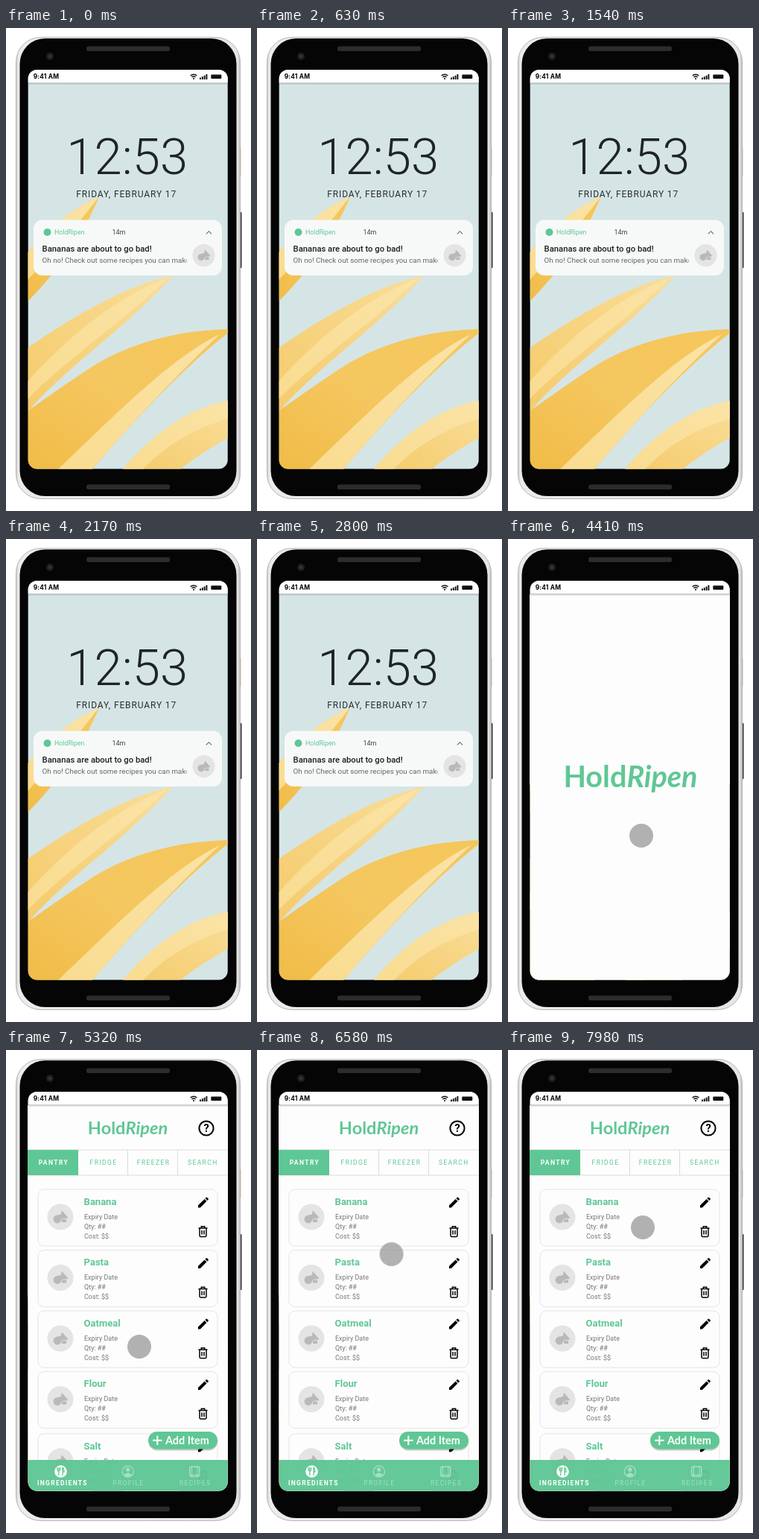
These frames come from a looping animation (329x648 px, 8000 ms). An HTML page:

```html
<!DOCTYPE html>
<html lang="en">
<head>
<meta charset="utf-8">
<title>Pantry app walkthrough</title>
<style>
  html, body { margin: 0; width: 100%; height: 100%; overflow: hidden; background: #fff; }
  svg { display: block; width: 100%; height: 100%; }
  text { font-family: Roboto, sans-serif; }
  .brand { font-family: Lato, sans-serif; font-weight: 700; fill: #5fc795; text-anchor: middle; }
  .brand tspan { font-style: italic; }
  .status { font: 700 8.4px Inter, sans-serif; letter-spacing: .2px; }
  .clock { font-size: 67px; font-weight: 300; text-anchor: middle; fill: #202426; }
  .date { font-size: 12px; letter-spacing: .87px; fill: #2b3032; }
  .tab { font-size: 8.5px; letter-spacing: 1.4px; fill: #5fc795; }
  .nav { font-size: 8.5px; letter-spacing: 1.3px; fill: #fff; }
  .on { font-weight: 700; fill: #fff; }
  .name { font-size: 13px; font-weight: 600; fill: #5fc795; }
  .info { font-size: 9px; fill: #777; }
  .add { font: 700 14.4px Lato, sans-serif; fill: #fff; }

  #splash, #pantry, #dot { animation: 8s linear infinite both; }
  #splash { animation-name: splash; }
  #pantry { animation-name: pantry; }
  #dot { animation-name: dot; }
  @keyframes splash {
    0%, 42% { opacity: 0; }
    45.6%, 100% { opacity: 1; }
  }
  @keyframes pantry {
    0%, 63% { opacity: 0; }
    66.4%, 100% { opacity: 1; }
  }
  @keyframes dot {
    0%, 41.9% { opacity: 0; transform: translate(179px, 374px); }
    42.9% { opacity: 1; }
    43.8% { transform: translate(179px, 374px); animation-timing-function: ease-in-out; }
    51.4%, 67.5% { transform: translate(179px, 398px); animation-timing-function: ease-in-out; }
    89% { transform: translate(181px, 242px); animation-timing-function: ease-out; }
    95%, 100% { opacity: 1; transform: translate(181px, 238px); }
  }
</style>
</head>
<body>
<svg viewBox="0 0 329 648" preserveAspectRatio="none">
  <defs>
    <clipPath id="screen"><rect x="29.7" y="56" width="268" height="535.5" rx="12"/></clipPath>
    <clipPath id="line"><rect x="48" y="300" width="194.5" height="24"/></clipPath>
    <linearGradient id="rim">
      <stop stop-color="#cfcfcf"/><stop offset=".012" stop-color="#ececec"/>
      <stop offset=".988" stop-color="#e6e6e6"/><stop offset="1" stop-color="#bdbdbd"/>
    </linearGradient>
    <linearGradient id="gold" x1="0" y1="1" x2="1" y2="0">
      <stop stop-color="#f1bc47"/><stop offset=".5" stop-color="#f5c760"/><stop offset="1" stop-color="#f4c65a"/>
    </linearGradient>
    <linearGradient id="amber" x1="0" y1="1" x2="1" y2="0">
      <stop stop-color="#f5cb6c"/><stop offset="1" stop-color="#f9dd98"/>
    </linearGradient>
    <linearGradient id="pale" x1="0" y1="1" x2="1" y2="0">
      <stop stop-color="#f9dc90"/><stop offset="1" stop-color="#fae3a6"/>
    </linearGradient>
    <linearGradient id="drop" x2="0" y2="1">
      <stop stop-color="#8a8f8c" stop-opacity=".6"/><stop offset="1" stop-color="#8a8f8c" stop-opacity="0"/>
    </linearGradient>
    <g id="food">
      <circle r="17.5" fill="#e4e4e4"/>
      <circle cx="-4" cy="3" r="5.4" fill="#b9b9b9"/>
      <path d="M2-8 10 1 1 2Z" fill="#b9b9b9" stroke="#b9b9b9" stroke-linejoin="round"/>
      <path d="M-5-2 2-4 2 3-3 4Z" fill="#b9b9b9"/>
      <path d="M2 3H8V7H2Z" fill="#b9b9b9"/>
    </g>
    <g id="card">
      <rect x="43" y=".5" width="241" height="76" rx="8" fill="#fdfdfd" stroke="#e5e5e5"/>
      <use href="#food" x="73" y="37.5"/>
      <g class="info">
        <text x="105" y="40.3">Expiry Date</text>
        <text x="105" y="53.2">Qty: ##</text>
        <text x="105" y="66">Cost: $$</text>
      </g>
      <path transform="translate(255.6 8.6) scale(.78)" d="M3 17.25V21h3.75L17.81 9.94l-3.75-3.75zM20.71 7.04a1 1 0 0 0 0-1.41l-2.34-2.34a1 1 0 0 0-1.41 0l-1.83 1.83 3.75 3.75z"/>
      <path d="M258.5 52.5H270.5M262.3 52V50.2H266.7V52M260 53V62.6Q260 64 261.4 64H267.6Q269 64 269 62.6V53M263 55.5V61M266 55.5V61" fill="none" stroke="#000" stroke-width="1.5"/>
    </g>
  </defs>

  <!-- phone body -->
  <rect x="313" y="160" width="3" height="38" rx="1" fill="#ead9c8"/>
  <rect x="313" y="247" width="3.5" height="75" rx="1" fill="#333"/>
  <rect x="13.5" y="12.5" width="301" height="619" rx="33" fill="url(#rim)" stroke="#b5b5b5"/>
  <rect x="18.5" y="14" width="291" height="614" rx="34" fill="#050505"/>
  <rect x="108" y="24.5" width="112" height="6.5" rx="2.5" fill="#2c2c2c"/>
  <rect x="108" y="612.5" width="112" height="6.5" rx="2.5" fill="#2c2c2c"/>
  <circle cx="59" cy="38" r="5" fill="#1f1f21"/>
  <circle cx="59" cy="38" r="2.2" fill="#34363a"/>

  <g clip-path="url(#screen)">
    <!-- lock screen -->
    <rect x="29" y="56" width="270" height="536" fill="#d5e5e6"/>
    <path fill="url(#gold)" d="M125 226Q75 248 29 301V367Q95 300 125 226Z"/>
    <path fill="url(#pale)" d="M125 226Q75 248 29 301V338Q80 285 125 226Z"/>

    <path fill="url(#amber)" d="M224 332C160 346 95 384 29 429V515C80 455 165 400 224 332Z"/>
    <path fill="url(#pale)" d="M218 335C150 360 85 412 29 474V498C80 445 160 392 218 335Z"/>

    <path fill="url(#gold)" d="M298 404C230 406 165 422 110 458Q65 488 29 514V592H116C190 505 250 447 298 409Z"/>
    <path fill="url(#pale)" d="M287 411C225 440 150 515 70 592H116C185 511 240 455 287 411Z"/>

    <path fill="url(#amber)" d="M298 500C255 508 205 535 157 592H234Q262 570 298 550Z"/>
    <path fill="url(#pale)" d="M298 500C255 508 205 535 157 592H184Q228 545 298 524Z"/>

    <text class="clock" x="162.7" y="195.8">12:53</text>
    <text class="date" x="94.3" y="226.7">FRIDAY, FEBRUARY 17</text>
    <rect x="37" y="257.5" width="253" height="74.5" rx="12" fill="#f7f9f9"/>
    <circle cx="55.5" cy="274" r="5" fill="#5fc795"/>
    <text x="65" y="277" font-size="8.8" fill="#5fc795">HoldRipen</text>
    <text x="142.5" y="277" font-size="9" fill="#444">14m</text>
    <path d="M268.8 276.3 272.4 272.7 276 276.3" fill="none" stroke="#666" stroke-width="1.1"/>
    <text x="48.6" y="299.7" font-size="11.25" font-weight="450" fill="#1d1d1d">Bananas are about to go bad!</text>
    <text x="48.6" y="315.3" font-size="9.8" fill="#666" clip-path="url(#line)">Oh no! Check out some recipes you can make</text>
    <use href="#food" transform="translate(265.5 305) scale(.86)"/>

    <g id="splash">
      <rect x="29" y="74" width="270" height="518" fill="#fdfdfd"/>
      <text class="brand" x="164.5" y="333" font-size="39.6">Hold<tspan>Ripen</tspan></text>
    </g>

    <g id="pantry">
      <rect x="29" y="74" width="270" height="518" fill="#fdfdfd"/>
      <text class="brand" x="163.5" y="112.5" font-size="23.6">Hold<tspan>Ripen</tspan></text>
      <circle cx="269" cy="105" r="9.6" fill="none" stroke="#000" stroke-width="2"/>
      <text x="269" y="110.2" font-size="14.5" font-weight="700" text-anchor="middle">?</text>

      <path d="M29 134H299M29 168H299M163.5 134V168M230.5 134V168" stroke="#dcdcdc"/>
      <rect x="29" y="134" width="68" height="34" fill="#5fc795"/>
      <g class="tab">
        <text class="on" x="43.7" y="154">PANTRY</text>
        <text x="112.6" y="154">FRIDGE</text>
        <text x="175.8" y="154">FREEZER</text>
        <text x="244" y="154">SEARCH</text>
      </g>

      <use href="#card" y="186.5"/>
      <use href="#card" y="268"/>
      <use href="#card" y="349.5"/>
      <use href="#card" y="431"/>
      <use href="#card" y="514.3"/>
      <g class="name">
        <text x="104.6" y="207.8">Banana</text>
        <text x="104.6" y="289.3">Pasta</text>
        <text x="104.6" y="370.8">Oatmeal</text>
        <text x="104.6" y="452.3">Flour</text>
        <text x="104.6" y="535.6">Salt</text>
      </g>

      <rect x="191.5" y="514" width="92.5" height="23.5" rx="11.7" fill="#000" opacity=".2"/>
      <rect x="191" y="512" width="93" height="23.5" rx="11.7" fill="#5fc795"/>
      <path d="M197 523.7H209.6M203.3 517.4V530" stroke="#fff" stroke-width="2"/>
      <text class="add" x="214" y="528.5">Add Item</text>

      <rect x="29" y="550" width="270" height="42" fill="#5fc795" fill-opacity=".97"/>
      <circle cx="73.5" cy="565.5" r="8.3" fill="#fff"/>
      <path d="M69 560V563.5Q69 565 70.8 565 72.6 565 72.6 563.5V560M70.8 560V571M76 571V560Q78 561.5 78 566H76" fill="none" stroke="#5fc795" stroke-width="1.3"/>
      <text class="nav on" x="42" y="584">INGREDIENTS</text>
      <g opacity=".42">
        <circle cx="163.8" cy="565.5" r="7.6" fill="none" stroke="#fff" stroke-width="1.4"/>
        <circle cx="163.8" cy="563" r="2.7" fill="#fff"/>
        <path d="M158.5 570.5Q163.8 564 169.1 570.5 163.8 575 158.5 570.5Z" fill="#fff"/>
        <text class="nav" x="143.3" y="584">PROFILE</text>
        <rect x="246.8" y="559" width="13" height="13" rx="2.5" fill="none" stroke="#fff" stroke-width="1.5"/>
        <path d="M249.5 558V573M257 558V573M247 570H260" stroke="#fff"/>
        <text class="nav" x="233" y="584">RECIPES</text>
      </g>
    </g>

    <!-- status bar -->
    <rect x="29" y="56" width="270" height="17.5" fill="#fff"/>
    <rect x="29" y="73.5" width="270" height="3" fill="url(#drop)"/>
    <text class="status" x="36.7" y="68">9:41 AM</text>
    <g fill="none" stroke="#111" stroke-width="1.4">
      <path d="M247.6 64Q252 60.3 256.4 64M249.4 66Q252 64 254.6 66"/>
      <path d="M261 69V66.5M263.8 69V65.3M266.6 69V63.8M269.4 69V62" stroke-width="1.9"/>
    </g>
    <circle cx="252" cy="68" r="1.1" fill="#111"/>
    <rect x="275.3" y="62.5" width="14" height="5.5" rx="1" fill="#111"/>

    <g id="dot"><circle r="16" fill="#999" fill-opacity=".76"/></g>
  </g>
</svg>
</body>
</html>
```
